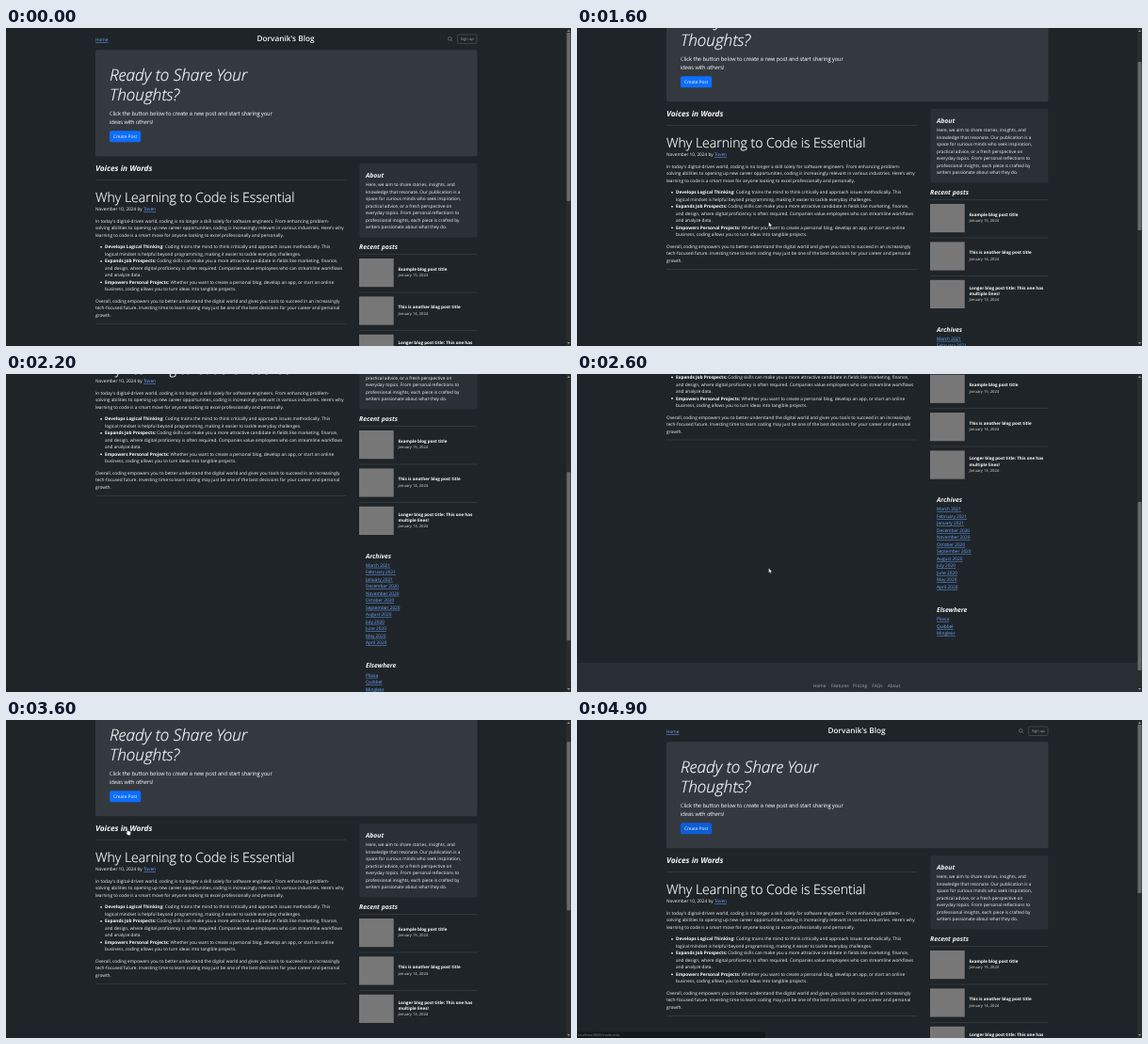
Write an HTML page that moves like this. It is 600 px wide and 338 px high and loops after 5000 ms.

```html
<!DOCTYPE html>
<html lang="en">
<head>
<meta charset="utf-8">
<title>Blog scroll</title>
<style>
  html, body { margin: 0; width: 100%; height: 100%; overflow: hidden; background: #1f2428; }
  svg { display: block; width: 100%; height: 100%; }
  text { font-family: "Open Sans", "Noto Sans", sans-serif; font-size: 4.75px; fill: #f3f5f7; text-rendering: geometricPrecision; white-space: pre; }
  .b { font-weight: 700; fill: #fff; }
  .h { font-weight: 700; font-style: italic; font-size: 6.8px; }
  .semi { font-weight: 600; }
  .light { font-weight: 300; fill: #fff; stroke: #fff; stroke-width: .2px; }
  .lead { stroke-width: .12px; }
  .it { font-style: italic; }
  .link { fill: #6ea8fe; text-decoration: underline; text-decoration-thickness: .35px; }
  .muted { fill: #a3a8ad; }
  .small { font-size: 4.1px; fill: #dde0e3; }
  .mid { text-anchor: middle; }
</style>
</head>
<body>
<svg viewBox="0 0 600 338" preserveAspectRatio="none">
  <rect width="600" height="338" fill="#1f2428"/>
  <g id="page"></g>
  <rect x="595" width="5" height="338" fill="#2b2c2d"/>
  <rect id="thumb" x="595.5" width="4" height="179" rx="1" fill="#68696a"/>
  <path d="M596 4l1.5-2 1.5 2zM596 334l1.5 2 1.5-2z" fill="#9a9b9c"/>
  <g id="status">
    <path d="M0 331.5H199q1 0 1 1V338H0z" fill="#15181b"/>
    <text x="1" y="336.4" style="font-size:3.6px;fill:#858a8f">localhost:3000/create-new</text>
  </g>
  <g id="cursor" fill="#fff" stroke="#111" stroke-width=".35">
    <path id="arrow" d="M0 0V5.3L1.2 4.2 2 6 2.9 5.6 2.1 3.9H3.7Z"/>
    <path id="hand" d="M.9.5Q1.4-.3 1.9.5V3L4.6 3.6Q5.2 3.8 5.1 4.5L4.6 7.8H1.8L-.3 5.2Q-.4 4.3 .9 4.9Z"/>
  </g>
</svg>
<script>
const $ = id => document.getElementById(id);
const parts = [];

const text = (x, y, str, cls = "", size) =>
  parts.push(`<text x="${x}" y="${y}" class="${cls}"${size ? ` style="font-size:${size}px"` : ""}>${str}</text>`);
const lines = (x, y, rows, cls, size, step = 7.5) =>
  rows.forEach((row, i) => text(x, y + i * step, row, cls, size));
const box = (x, y, w, h, fill, r = 0, extra = "") =>
  parts.push(`<rect x="${x}" y="${y}" width="${w}" height="${h}" rx="${r}" fill="${fill}" ${extra}/>`);
const rule = (x, y, w) => box(x, y, w, .6, "#3e4348");
const bold = str => `<tspan class="b">${str}</tspan>`;

function header() {
  text(95, 14, "Home", "link");
  text(297, 13.8, "Dorvanik's Blog", "mid semi", 8.2);
  parts.push('<g fill="none" stroke="#8d9297" stroke-width=".55"><circle cx="471.3" cy="11.3" r="1.8"/><path d="M472.6 12.6l1.5 1.5"/></g>');
  box(479.5, 7, 20.5, 9.5, "none", 1.2, 'stroke="#5c636a" stroke-width=".5"');
  text(489.8, 13.3, "Sign up", "mid muted", 4.1);
}

function hero() {
  box(95, 23.2, 405.5, 113, "#343940", 2);
  lines(110, 56, ["Ready to Share Your", "Thoughts?"], "light it", 17.2, 21);
  lines(110, 92.5, ["Click the button below to create a new post and start sharing your", "ideas with others!"], "light lead", 5.86, 9.4);
  box(110, 109.3, 33.2, 12, "#0d6efd", 1.9, 'id="btn"');
  text(126.6, 117, "Create Post", "mid");
}

function article() {
  text(95, 152.2, "Voices in Words", "h", 8.27);
  rule(95, 161.3, 266);
  text(95, 185.2, "Why Learning to Code is Essential", "light", 14.05);
  text(95, 194.3, 'November 10, 2024 by <tspan class="link">Toven</tspan>');
  lines(95, 206.9, [
    "In today's digital-driven world, coding is no longer a skill solely for software engineers. From enhancing problem-",
    "solving abilities to opening up new career opportunities, coding is increasingly relevant in various industries. Here's why",
    "learning to code is a smart move for anyone looking to excel professionally and personally."]);
  lines(105, 234.4, [
    bold("Develops Logical Thinking:") + " Coding trains the mind to think critically and approach issues methodically. This",
    "logical mindset is helpful beyond programming, making it easier to tackle everyday challenges.",
    bold("Expands Job Prospects:") + " Coding skills can make you a more attractive candidate in fields like marketing, finance,",
    "and design, where digital proficiency is often required. Companies value employees who can streamline workflows",
    "and analyze data.",
    bold("Empowers Personal Projects:") + " Whether you want to create a personal blog, develop an app, or start an online",
    "business, coding allows you to turn ideas into tangible projects."]);
  for (const y of [232.8, 247.8, 270.3]) parts.push(`<circle cx="101" cy="${y}" r=".9" fill="#f3f5f7"/>`);
  lines(95, 291.9, [
    "Overall, coding empowers you to better understand the digital world and gives you tools to succeed in an increasingly",
    "tech-focused future. Investing time to learn coding may just be one of the best decisions for your career and personal",
    "growth."]);
  rule(95, 314, 266);
}

function sidebar() {
  box(375.3, 144, 125.2, 78.6, "#2b3036", 2);
  text(382, 158.6, "About", "h");
  lines(382, 168.4, [
    "Here, we aim to share stories, insights, and",
    "knowledge that resonate. Our publication is a",
    "space for curious minds who seek inspiration,",
    "practical advice, or a fresh perspective on",
    "everyday topics. From personal reflections to",
    "professional insights, each piece is crafted by",
    "writers passionate about what they do."]);
  text(375, 235.4, "Recent posts", "h");
  const posts = [
    [["Example blog post title"], 15],
    [["This is another blog post title"], 14],
    [["Longer blog post title: This one has", "multiple lines!"], 13]];
  posts.forEach(([title, day], i) => {
    const y = 240.3 + i * 40.4, top = y + 17.5 - (title.length - 1) * 3;
    rule(375, y, 125.5);
    box(375, y + 4.7, 36.7, 30.2, "#777");
    lines(416.5, top, title, "b", 4.55, 6.3);
    text(416.5, top + title.length * 6.4, `January ${day}, 2024`, "small");
  });
  text(382, 380.5, "Archives", "h");
  const months = "March February January December November October September August July June May April".split(" ");
  lines(382, 389.8, months.map((m, i) => `${m} ${i < 3 ? 2021 : 2020}`), "link");
  text(382, 497, "Elsewhere", "h");
  lines(382, 506.8, ["Plovia", "Quibbel", "Mingleor"], "link");
}

function footer() {
  box(0, 551.3, 600, 61, "#2a2f35");
  [["Home", 251], ["Features", 269.7], ["Pricing", 293], ["FAQs", 313.3], ["About", 329.8]]
    .forEach(([label, x]) => text(x, 576.9, label, "muted"));
  rule(95, 586, 405.5);
  text(297.5, 597.6, "© 2024 Company, Inc", "mid muted");
}

[header, hero, article, sidebar, footer].forEach(draw => draw());
$("page").innerHTML = parts.join("");

// Linear interpolation through [time, value] pairs.
function track(keys, t) {
  const i = keys.findIndex(k => k[0] > t);
  if (i < 0) return keys[keys.length - 1][1];
  if (i === 0) return keys[0][1];
  const [t0, a] = keys[i - 1], [t1, b] = keys[i];
  return a + (b - a) * (t - t0) / (t1 - t0);
}

const scrollKeys = [[1400, 0], [1800, 116], [2200, 185], [2800, 274], [3200, 274], [3600, 34], [3700, 31], [4100, 31], [4500, 0]];
const xKeys = [[500, 188], [1100, 202.7], [1500, 203.5], [2600, 203.5], [3200, 139], [3600, 127.5]];
const yKeys = [[500, 183], [1100, 203.7], [1500, 206.2], [2600, 206.2], [3200, 129], [3600, 114.8]];

function render(ms) {
  const t = Math.floor((ms % 5000) / 100) * 100;
  const scroll = track(scrollKeys, t);
  const hover = t >= 4500, hand = t >= 3500;
  $("page").setAttribute("transform", `translate(0 ${-scroll})`);
  $("thumb").setAttribute("y", 5 + scroll * 328 / 612);
  $("btn").setAttribute("fill", hover ? "#0b5ed7" : "#0d6efd");
  $("status").setAttribute("visibility", hover ? "visible" : "hidden");
  const shown = (t >= 500 && t < 2100) || (t >= 2600 && t < 4700);
  $("cursor").style.display = shown ? "" : "none";
  $("cursor").setAttribute("transform", `translate(${track(xKeys, t)} ${track(yKeys, t)})`);
  $("arrow").style.display = hand ? "none" : "";
  $("hand").style.display = hand ? "" : "none";
}

const start = performance.now();
function tick() {
  render(performance.now() - start);
  requestAnimationFrame(tick);
}
tick();
</script>
</body>
</html>
```
